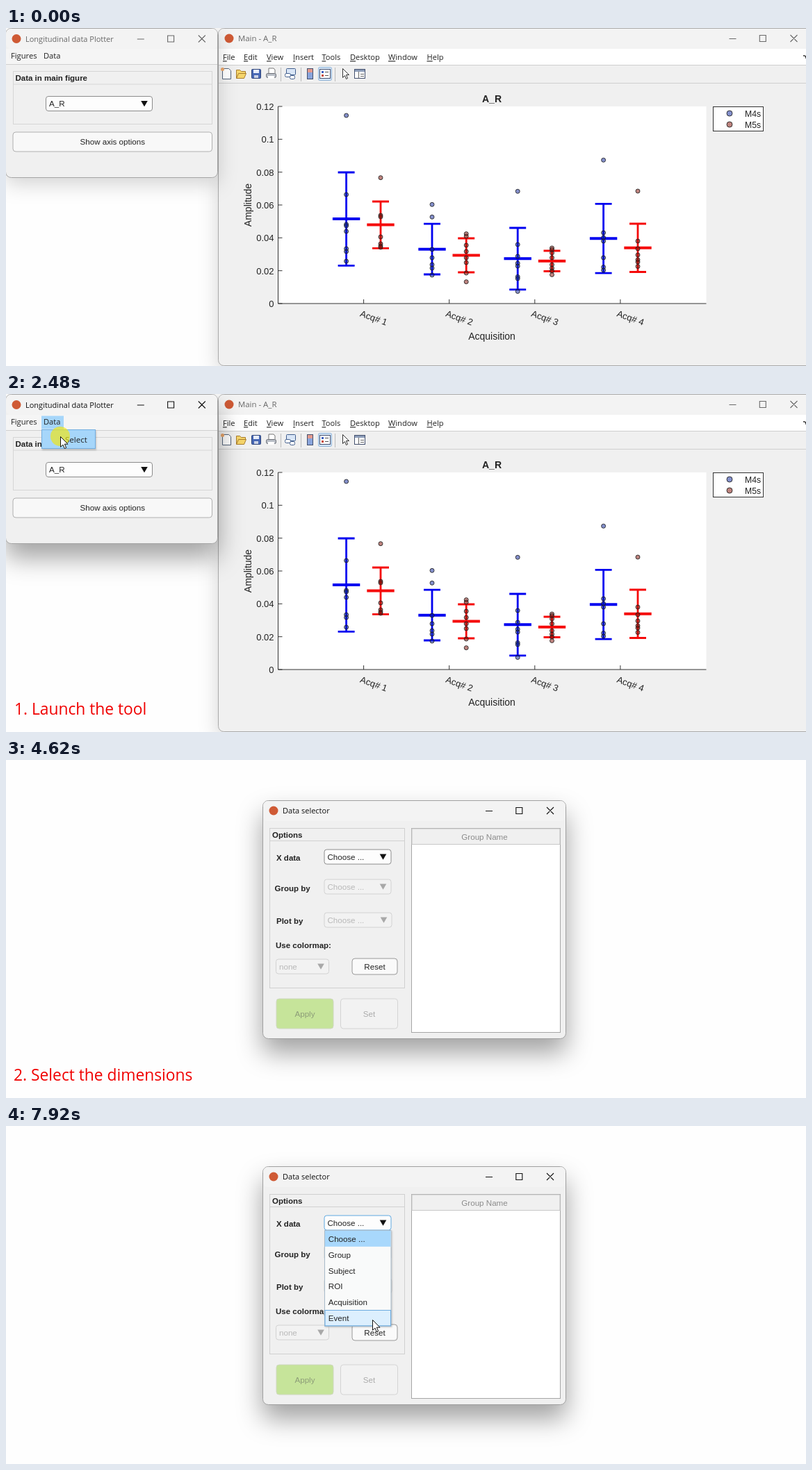
Write an HTML page that moves like this. It is 1151 px wide and 487 px high and loops after 7.99 s.

```html
<!DOCTYPE html>
<html lang="en">
<head>
<meta charset="utf-8">
<title>Data plotter walkthrough</title>
<style>
html, body { margin: 0; width: 100%; height: 100%; overflow: hidden; background: #fefefe; }
svg { display: block; font: 11.6px "Liberation Sans", Arial, sans-serif; }
text { white-space: pre; }
.ui { font-family: "Open Sans", "Noto Sans", sans-serif; }
.b { font-weight: bold; font-size: 11.5px; }
.mid { text-anchor: middle; }
.end { text-anchor: end; }
.idle { filter: drop-shadow(0 9px 14px rgba(0,0,0,.17)); }
.active { filter: drop-shadow(0 20px 18px rgba(0,0,0,.36)); }
.cap { font-size: 22.8px; fill: #f00000; }
</style>
</head>
<body>
<svg id="stage" width="1151" height="487" viewBox="0 0 1151 487"></svg>
<script>
const DURATION = 7990;
const INK = '#222';
const text = (x, y, s, attrs = '') => `<text x="${x}" y="${y}" ${attrs}>${s}</text>`;
const ui = (x, y, s, size = 11.1, attrs = '') =>
  text(x, y, s, `class="ui" style="font-size:${size}px" ${attrs}`);
const bold = (x, y, s) => text(x, y, s, 'class="b"');
const rect = (x, y, w, h, fill, stroke = 'none', r = 0, attrs = '') =>
  `<rect x="${x}" y="${y}" width="${w}" height="${h}" rx="${r}" fill="${fill}" stroke="${stroke}" ${attrs}/>`;
const path = (d, stroke, width = 1, fill = 'none') =>
  `<path d="${d}" stroke="${stroke}" stroke-width="${width}" fill="${fill}"/>`;
const group = (id, body, attrs = '') => `<g id="${id}" ${attrs}>${body}</g>`;

// Title bar: plain app badge, caption and the three window buttons
const titleBar = (x, y, s, size, right) =>
  `<circle cx="${x}" cy="${y}" r="6.5" fill="#cf5a35"/>` +
  ui(x + 13, y + 4.2, s, size, 'fill="currentColor"') +
  path(`M${right - 5} ${y + .5}h10M${right + 38.8} ${y - 4.5}h9v9h-9zM${right + 83} ${y - 5}l10 10m0 -10l-10 10`,
    'currentColor', 1.1);

const arrow = (x, y, fill) => `<path d="M${x - 4.8} ${y - 4}h9.6l-4.8 8.2z" fill="${fill}"/>`;

const combo = (x, y, w, s, on, attrs = '') =>
  rect(x + .5, y + .5, w, 21, on ? '#fdfdfd' : '#f2f2f2', on ? '#8c8c8c' : '#d2d2d2', 3.5, attrs) +
  text(x + 5, y + 15, s, `fill="${on ? INK : '#b8b8b8'}"`) +
  arrow(x + w - 11, y + 11, on ? '#111' : '#a8a8a8');

const button = (x, y, w, h, s, fill, stroke, ink) =>
  rect(x + .5, y + .5, w, h, fill, stroke, 4) +
  text(x + w / 2 + .5, y + h / 2 + 4.6, s, `class="mid" fill="${ink}"`);

// Plot contents, all in stage pixels: x, bar top, mean, bar bottom, points
const series = [
  [489.6, 208, 275, 342.3, [126, 240, 283, 285, 293, 318, 322, 336]],
  [539, 250, 283.6, 317.3, [215.7, 270, 272, 301, 311, 314, 316]],
  [613, 282.2, 318.7, 355, [254.3, 272.3, 319, 331, 341, 346, 356]],
  [662.2, 303, 327.5, 352, [296.6, 300, 313, 322, 331, 338, 353, 365.7]],
  [736.2, 288, 332.2, 376.8, [235.3, 312, 329, 339, 343, 358.5, 361, 379.5]],
  [785.5, 321, 335.7, 350.5, [317, 319.5, 324, 331, 341, 346, 350, 355.5]],
  [859.6, 253.3, 303.2, 353.2, [190.3, 295, 302, 307, 331, 344.5, 349]],
  [909, 282, 316.7, 351.5, [235, 307, 318, 327, 334, 337, 343.5]]
];
const dot = (x, y, red, r = 3) =>
  `<circle cx="${x}" cy="${y}" r="${r}" fill="${red ? '#7d0a00' : '#092199'}" fill-opacity=".5" stroke="#222" stroke-opacity=".85"/>`;
const errorBars = series.map(([x, top, mean, low, ys], i) => {
  const color = i % 2 ? '#f50a0a' : '#0000f0';
  return path(`M${x - 12} ${top}h24M${x - 12} ${low}h24M${x} ${top}V${low}`, color, 2.8) +
    path(`M${x - 19.7} ${mean}h39.4`, color, 4) +
    ys.map(y => dot(x, y, i % 2)).join('');
}).join('');

// Y axis with n intervals up to max, and its label
const yAxis = (max, n, labelX) => {
  let s = '';
  for (let i = 0; i <= n; i++) {
    const y = 397 - 284 * i / n;
    s += path(`M391.5 ${y.toFixed(1)}h6`, '#333') +
      text(385.5, y + 5, +(max * i / n).toFixed(2), 'class="end" style="font-size:13px"');
  }
  return s + `<text transform="translate(${labelX} 255) rotate(-90)" class="mid" style="font-size:14px">Amplitude</text>`;
};
const xAxis = [1, 2, 3, 4].map(n => {
  const x = 391.5 + 123.1 * n;
  return path(`M${x} 397v-6`, '#333') +
    `<text transform="translate(${x - 6} 415) rotate(20)" style="font-size:13px">Acq# ${n}</text>`;
}).join('');

const toolbar =
  path('M311.5 58.5h9l3 3v12h-12z', '#53637a', 1, '#fff') + rect(309, 57, 5, 5, '#e8a56a', 'none', 2.5) +
  path('M331.5 72.5v-12h5l2 2h6v3M331.5 72.5l3 -7h11l-3 7z', '#a87c2c', 1, '#f5d56b') +
  rect(353.5, 59.5, 13, 13, '#4868b4', '#2d4379', 1) + rect(356, 60, 8, 5, '#e8eefb') + rect(357, 68, 6, 4, '#cbd3e6') +
  path('M378 65v-7h7l2 2v5', '#777', 1, '#fff') + rect(374.5, 65.5, 14, 6, '#b9bec6', '#6b6f77', 2) + rect(377, 69, 9, 4, '#fff') +
  path('M395.5 57v20M424.5 57v20M473.5 57v20', '#bbb') +
  rect(403.5, 58.5, 13, 9, '#d9e6f7', '#3f5c8c', 1) + rect(401.5, 65.5, 8, 5, '#fff', '#3f5c8c', 2) + rect(408.5, 68.5, 7, 5, '#fff', '#3f5c8c', 2) +
  rect(433.5, 58.5, 8, 15, '#8aa5dc', '#44506e') + rect(434, 59, 7, 5, '#e39a8e') +
  rect(449.5, 56.5, 19, 19, '#d4e6f8', '#8fb4d8', 2) + rect(451.5, 59.5, 15, 13, '#fff', '#44506e') +
  rect(454, 62, 3, 3, '#3c5fc0') + rect(454, 67, 3, 3, '#c4452f') + path('M459 63.5h5M459 68.5h5', '#555') +
  path('M484.500 58.500v13l3 -3 2 5 2 -1 -2 -5h4z', '#333', 1, '#fff') +
  rect(501.5, 59.5, 15, 13, '#fff', '#44506e') + rect(502, 60, 14, 3, '#8c9cb8') + path('M507.5 63v9M510 66.500h5M510 69.500h5', '#666');

const mainMenu = [['File', 312], ['Edit', 342], ['View', 375], ['Insert', 413], ['Tools', 454.500],
  ['Desktop', 495], ['Window', 550], ['Help', 605.500]].map(([s, x]) =>
  ui(x, 46.3, `<tspan text-decoration="underline">${s[0]}</tspan>${s.slice(1)}`)).join('');

const mainWindow =
  rect(305.5, .5, 872, 486, '#f0f0f0', '#aaa', 8, 'class="idle"') +
  `<path d="M306 30V9q0 -8 8 -8H1151V30z" fill="#f3f3f3"/>` +
  rect(306, 30, 845, 23, '#fff') + path('M306 53.5h845M306 79.5h845', '#cfcfcf') +
  `<g color="#686868">${titleBar(321, 15, 'Main - A_R', 11.4, 1045.5)}</g>` +
  mainMenu + path('M1147 40q4 -1 4 4', '#222', 1.3) + toolbar +
  rect(391, 113, 616.500, 284, '#fff') + path('M391.5 113V397H1007.5', '#333') + xAxis +
  text(699, 106.500, 'A_R', 'class="mid" style="font-weight:bold;font-size:14px"') +
  text(699, 449, 'Acquisition', 'class="mid" style="font-size:14px"') +
  group('full', yAxis(.12, 6, 353) + errorBars) + group('empty', yAxis(1, 5, 359)) +
  rect(1017.5, 113.5, 72, 35, '#fff', '#333') + dot(1041, 123, 0, 4) + dot(1041, 139, 1, 4) +
  text(1063, 128, 'M4s', 'style="font-size:12.200px"') + text(1063, 143.500, 'M5s', 'style="font-size:12.200px"');

const plotter =
  rect(-.5, .5, 305, 215, '#f0f0f0', '#a5a5a5', 8, 'id="frame"') +
  rect(0, 1, 304, 29, '#f3f3f3', 'none', 7) + rect(0, 30, 304, 22, '#f5f5f5') + path('M0 52.500h304', '#cfcfcf') +
  group('bar', titleBar(15, 15.500, 'Longitudinal data Plotter', 11, 193.800)) +
  rect(10.5, 62.5, 286, 76, 'none', '#d6d6d6') + path('M10.5 81h286', '#d6d6d6') +
  bold(13.500, 76, 'Data in main figure') + combo(57, 98, 153, 'A_R', true) +
  button(9.500, 149.500, 286.500, 28, 'Show axis options', '#f8f8f8', '#b0b0b0', INK) +
  group('menu', rect(51, 31.500, 32, 19, '#a6d6fa') +
    rect(51.5, 51.5, 77, 27, '#f7f7f7', '#72aee0', 0, 'id="item" style="filter:drop-shadow(1px 2px 1px #0003)"') +
    ui(85, 69.500, 'Select', 11.6)) +
  ui(7, 44.300, 'Figures', 11.2) + ui(54, 44.300, 'Data', 11.1);

const ROW = 22.8;
const options = ['Choose ...', 'Group', 'Subject', 'ROI', 'Acquisition', 'Event'];
const selector =
  rect(369.5, 58.5, 436, 343, '#f0f0f0', '#a0a0a0', 8, 'class="active"') +
  rect(370, 59, 435, 29, '#f3f3f3', 'none', 7) +
  `<g color="#111">${titleBar(385, 73, 'Data selector', 11, 695)}</g>` +
  rect(379.5, 98.5, 194, 230, 'none', '#d0d0d0') + path('M379.5 116.500h194', '#d0d0d0') +
  bold(383, 111.500, 'Options') + bold(389, 145, 'X data') + bold(386.500, 189, 'Group by') +
  bold(389, 235.500, 'Plot by') + bold(388, 271.300, 'Use colormap:') +
  combo(457.500, 128.500, 96, 'Choose ...', true, 'id="choice"') +
  combo(457.500, 171.500, 96, 'Choose ...') + combo(457.500, 219.500, 97, 'Choose ...') + combo(388, 286.500, 76, 'none') +
  button(497.500, 285.500, 65, 23, 'Reset', '#fafafa', '#999', INK) +
  button(388.500, 343.500, 82, 43, 'Apply', '#c6e49a', '#cfd8c0', '#8c9c78') +
  button(481, 343.500, 82, 43, 'Set', '#f2f2f2', '#d4d4d4', '#ababab') +
  rect(583.5, 98.5, 214, 294, '#fff', '#a6a6a6') + rect(584, 99, 213, 22.500, '#f0f0f0', '#c8c8c8') +
  text(688.500, 114.700, 'Group Name', 'class="mid" fill="#8c8c8c"') +
  group('list', rect(458.5, 150.5, 95.5, 138, '#f9fafa', '#a9bccb', 0, 'style="filter:drop-shadow(1px 1px 1px #0003)"') +
    rect(459, 151, 94.500, 22.800, '#a8d8fc') +
    rect(459, 151.500, 94.500, ROW - .5, '#dceffe', '#6cabe0', 0, 'id="hover"') +
    options.map((s, i) => text(463.800, 167 + ROW * i, s)).join(''));

const stage = document.getElementById('stage');
stage.innerHTML = `<g fill="${INK}">` +
  group('main', mainWindow) + group('plotter', plotter) + group('selector', selector) + '</g>' +
  text(12, 462, '1. Launch the tool', 'id="cap1" class="ui cap"') +
  text(11, 462, '2. Select the dimensions', 'id="cap2" class="ui cap"') +
  group('pointer', '<circle id="press" r="14" fill="#f2e60a" fill-opacity=".65"/>' +
    path('M.5 .5V15.300L3.900 12.100 6.300 17.600 8.700 16.500 6.300 11.200H11z', '#111', 1, '#fff'));

const $ = id => document.getElementById(id);
const show = (id, on) => $(id).style.display = on ? '' : 'none';
const clamp = v => Math.max(0, Math.min(1, v));
const between = (t, a, b) => t >= a && t < b;

// Pointer stops: time, x, y
const route = [
  [230, 1010, 475], [1080, 104, 36], [1550, 69, 36.500], [1950, 69, 36.500], [2400, 78, 61], [2540, 78, 61], [2740, 78, 64],
  [5020, 568, 490], [5500, 463, 119], [5770, 482, 136], [5890, 482, 136], [5970, 484.500, 137],
  [7560, 484.500, 137], [7920, 527, 279], [DURATION, 527, 279]
];
function pointerAt(t) {
  const i = Math.max(1, route.findIndex(p => p[0] > t));
  const [t0, x0, y0] = route[i - 1], [t1, x1, y1] = route[i];
  const k = clamp((t - t0) / (t1 - t0)), e = k * k * (3 - 2 * k);
  return [x0 + (x1 - x0) * e, y0 + (y1 - y0) * e];
}

function draw(t) {
  const [x, y] = pointerAt(t);
  const focused = t >= 1620;
  show('pointer', between(t, 290, 2870) || t >= 5090);
  show('press', between(t, 1620, 1680) || between(t, 2410, 2670) || between(t, 6910, 7040));
  $('pointer').setAttribute('transform', `translate(${x.toFixed(1)} ${y.toFixed(1)})`);

  show('cap1', between(t, 70, 2870));
  show('cap2', between(t, 4620, 7040));

  $('main').style.opacity = t < 4010 ? 1 : clamp((4140 - t) / 150);
  $('plotter').style.opacity = t < 3600 ? 1 : clamp((3810 - t) / 260);
  show('full', t < 3600);
  show('empty', t >= 3600);

  $('frame').setAttribute('class', focused ? 'active' : 'idle');
  $('bar').style.color = focused ? '#111' : '#686868';
  show('menu', between(t, 1950, 2740));
  $('item').setAttribute('fill', y > 51 ? '#a6d6fa' : '#f7f7f7');

  show('selector', t >= 4620);
  $('choice').setAttribute('stroke', t >= 6980 ? '#5fa8e0' : '#8c8c8c');
  show('list', t >= 7580);
  const row = Math.min(5, Math.floor((y - 151) / ROW));
  show('hover', row > 0);
  $('hover').setAttribute('y', 151.500 + ROW * row);
}

const start = performance.now();
function tick() {
  draw((performance.now() - start) % DURATION);
  requestAnimationFrame(tick);
}
tick();
</script>
</body>
</html>
```
